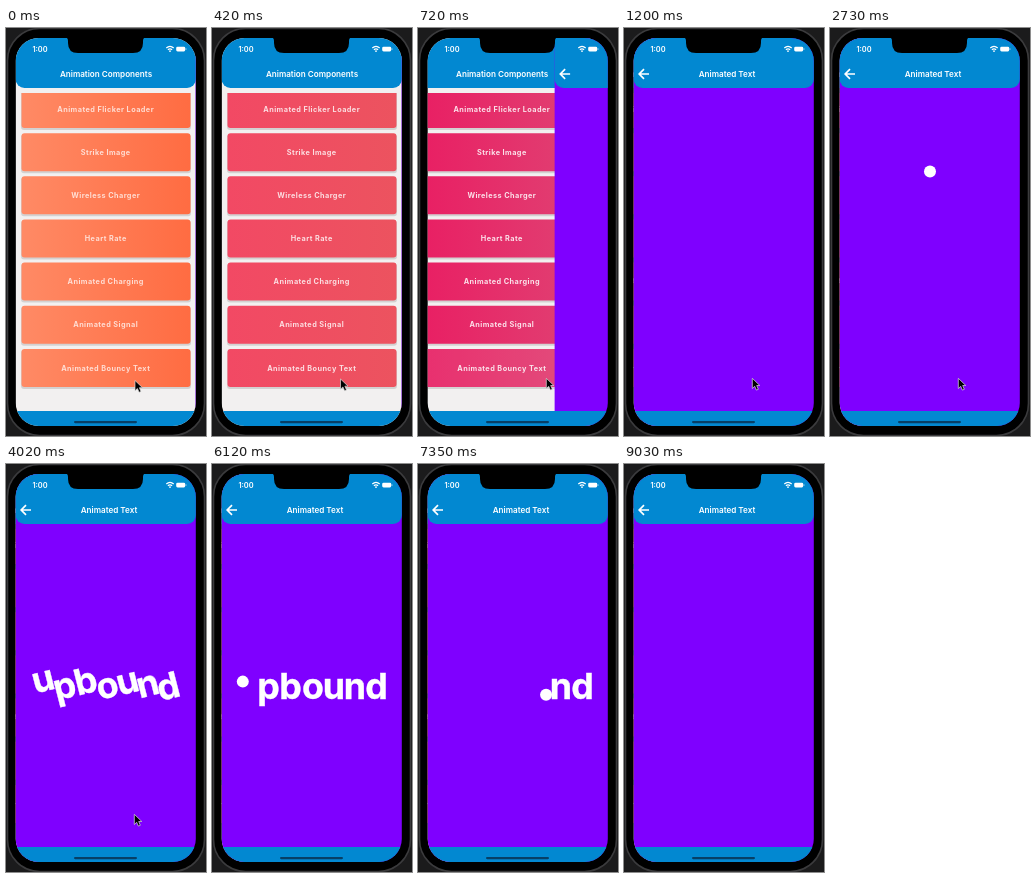
Animation of 200 by 408 pixels, one loop 9.48 s. Source, as an HTML page:

```html
<!DOCTYPE html>
<html lang="en">
<head>
<meta charset="utf-8">
<title>Animated Text</title>
<style>
  html, body { margin: 0; width: 100%; height: 100%; overflow: hidden; background: #1b1b1c; }
  svg { display: block; width: 100vw; height: 100vh; filter: blur(.35px); }
  text { font-family: Inter, Roboto, sans-serif; text-anchor: middle; fill: #fff; }
  .title { font-size: 8.15px; font-weight: 600; }
  .label { font-size: 7.3px; font-weight: 700; letter-spacing: .44px; }
  .letter { font-size: 35.8px; font-weight: 700; stroke: #fff; stroke-width: .4px; }
  .blue { fill: #0288d1; }
</style>
</head>
<body>
<svg viewBox="0 0 200 408">
  <defs>
    <clipPath id="screen"><rect x="9.7" y="10" width="180.1" height="388" rx="23"/></clipPath>
    <clipPath id="listArea"><rect x="-10" y="65" width="220" height="318"/></clipPath>
    <linearGradient id="fill"><stop id="left" offset="0"/><stop id="right" offset="1"/></linearGradient>
    <path id="header" class="blue" d="M9.5 0H190V51a9 9 0 0 1-9 9H18.5a9 9 0 0 1-9-9Z"/>
  </defs>

  <rect x="1.5" y=".5" width="197" height="407" rx="32" fill="#000" stroke="#3b3b3d" stroke-width="1.6"/>

  <g clip-path="url(#screen)">
    <g id="listPage">
      <rect x="9.5" width="180.5" height="408" fill="#f2f0f0"/>
      <g id="buttons" clip-path="url(#listArea)"></g>
      <use href="#header"/>
      <text class="title" x="100" y="49">Animation Components</text>
    </g>
    <g id="textPage">
      <rect x="9.5" width="180.5" height="408" fill="#7f00ff"/>
      <use href="#header"/>
      <path d="M25 46H15.5M20 41.2L15.2 46l4.8 4.8" fill="none" stroke="#fff" stroke-width="1.7"/>
      <text class="title" x="103" y="49">Animated Text</text>
      <g id="word"></g>
      <circle id="ball" r="6" fill="#fff"/>
    </g>
    <rect class="blue" x="9.5" y="383" width="180.5" height="15"/>
    <rect x="68" y="393" width="63" height="2.2" rx="1.1" fill="#073f66"/>
  </g>

  <path d="M58 9q4 0 4 4v2q0 10 10 10h55q10 0 10-10v-2q0-4 4-4Z" fill="#000"/>
  <text x="34" y="24" font-size="7.4" font-weight="600">1:00</text>
  <g fill="none" stroke="#fff" stroke-width="1.2">
    <path d="M160.3 20q3.7-3.4 7.4 0M161.9 21.8q2.1-1.9 4.2 0"/>
    <circle cx="164" cy="23.2" r=".3"/>
  </g>
  <rect x="170.2" y="18.7" width="9" height="4.8" rx="1.4" fill="#fff"/>
  <rect x="179.6" y="20.2" width=".8" height="1.8" fill="#fff" opacity=".6"/>

  <path id="cursor" d="M0 0V10.2L2.4 8l1.7 3.8 1.9-.8L4.4 7.2H7.5Z" fill="#000" stroke="#ddd" stroke-width=".7"/>
</svg>

<script>
  const LOOP = 9480;
  const LABELS = ['Animated Flicker Loader', 'Strike Image', 'Wireless Charger', 'Heart Rate',
    'Animated Charging', 'Animated Signal', 'Animated Bouncy Text'];

  // glyph, resting centre x, height of its arc
  const LETTERS = [['u', 34, 49], ['p', 56.5, 4], ['b', 78.5, 37], ['o', 101, 7],
    ['u', 122, 37], ['n', 143, 19], ['d', 164.5, 1]];

  const WORD_Y = 222, FLOOR_Y = 231;
  const SLIDE = [638, 1158], DROP = [2490, 2820], BURST = [2820, 4320];
  const EAT_START = 6120, FIRST_LANDING = 6190, HOP = 290, BALL_END = 7930;

  const $ = id => document.getElementById(id);
  const add = (parent, tag, attrs, text = '') => {
    const node = document.createElementNS('http://www.w3.org/2000/svg', tag);
    for (const key in attrs) node.setAttribute(key, attrs[key]);
    node.textContent = text;
    return parent.appendChild(node);
  };
  const span = (t, [from, to]) => Math.min(1, Math.max(0, (t - from) / (to - from)));
  const mix = (a, b, p) => a + (b - a) * p;
  const blend = (a, b, p) => `rgb(${a.map((v, i) => Math.round(mix(v, b[i], p)))})`;
  const easeOut = p => 1 - (1 - p) ** 2;
  const move = (node, x, y = 0, rest = '') =>
    node.setAttribute('transform', `translate(${x} ${y}) ${rest}`);
  const show = (node, on) => node.setAttribute('visibility', on ? 'visible' : 'hidden');

  const captions = LABELS.map((label, i) => {
    const y = 81 + i * 43.15;
    const button = add($('buttons'), 'g', {});
    add(button, 'rect', { x: 15, y: y - 18, width: 170, height: 39, rx: 3, fill: '#000', opacity: .13 });
    add(button, 'rect', { x: 15.5, y: y - 19, width: 169, height: 38, rx: 3, fill: 'url(#fill)' });
    return add(button, 'text', { class: 'label', x: 99.7, y: y + 2.7 }, label);
  });
  const pressed = $('buttons').lastChild;
  const glyphs = LETTERS.map(([char]) => add($('word'), 'text', { class: 'letter', y: 13 }, char));

  function drawList(t) {
    const p = span(t, [0, 700]);
    $('left').setAttribute('stop-color', blend([255, 138, 101], [233, 30, 99], p));
    $('right').setAttribute('stop-color', blend([255, 108, 66], [224, 66, 115], p));
    captions.forEach(caption => caption.setAttribute('opacity', mix(.74, .86, p)));
    pressed.setAttribute('opacity', mix(1, .92, span(t, [500, 650])));

    const slide = easeOut(span(t, SLIDE));
    move($('listPage'), -54 * slide);
    move($('textPage'), 180 * (1 - slide));
  }

  function drawWord(t) {
    const p = easeOut(span(t, BURST));
    glyphs.forEach((glyph, i) => {
      const [, x, arc] = LETTERS[i];
      const eaten = i ? FIRST_LANDING + i * HOP : EAT_START;
      show(glyph, t >= BURST[0] && t < eaten);
      const scale = Math.min(1, .15 + p * 4);
      move(glyph, mix(100, x, p), WORD_Y - 4 * p * (1 - p) * arc, `rotate(${360 * p}) scale(${scale})`);
    });
  }

  function drawBall(t) {
    const dropping = t >= DROP[0] && t < DROP[1];
    const eating = t >= EAT_START && t < BALL_END;
    show($('ball'), dropping || eating);
    if (dropping) {
      move($('ball'), 100, mix(54, WORD_Y, span(t, DROP) ** 2));
    } else if (t < FIRST_LANDING) {
      move($('ball'), 30.8, mix(217.6, FLOOR_Y, span(t, [EAT_START, FIRST_LANDING]) ** 1.5));
    } else if (eating) {
      const step = (t - FIRST_LANDING) / HOP;
      const i = Math.min(5, Math.floor(step));
      const f = step - i;
      const x = mix(LETTERS[i][1], LETTERS[i + 1][1], f) + Math.min(6, step * 1.6);
      move($('ball'), x, FLOOR_Y - 4 * f * (1 - f) * 24);
    }
  }

  function drawCursor(t) {
    const p = span(t, [0, 600]);
    show($('cursor'), t < EAT_START);
    move($('cursor'), mix(129, 128.3, p), mix(352.5, 350.3, p));
  }

  function frame() {
    const t = performance.now() % LOOP;
    drawList(t);
    drawWord(t);
    drawBall(t);
    drawCursor(t);
    requestAnimationFrame(frame);
  }
  frame();
</script>
</body>
</html>
```
